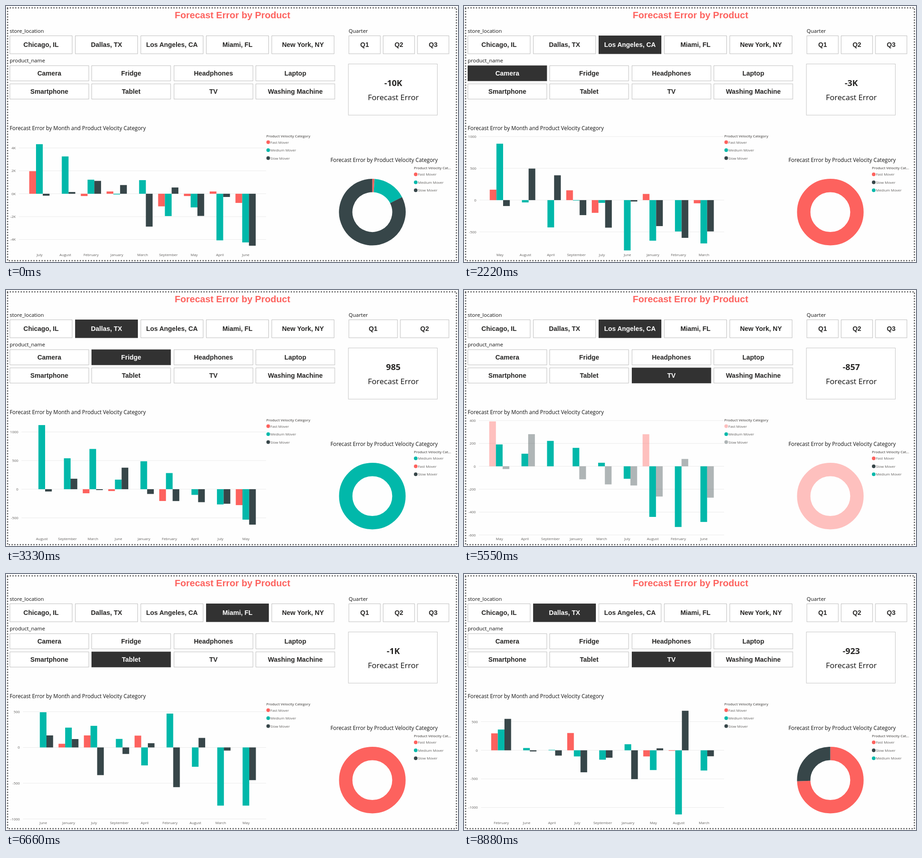
Animation of 994 by 563 pixels, one loop 9.99 s. Source, as an HTML page:

```html
<!DOCTYPE html>
<html lang="en">
<head>
<meta charset="utf-8">
<title>Forecast dashboard</title>
<style>
  html, body { margin: 0; width: 100%; height: 100%; overflow: hidden; background: #fefefe; }
  svg { display: block; font-family: "Open Sans", "Noto Sans", sans-serif; }
  .title { font: bold 20.5px "Liberation Sans", Arial, sans-serif; fill: #fd625e; }
  .btn { font: bold 14.35px "Liberation Sans", Arial, sans-serif; fill: #252423; }
  .on { fill: #fff; }
  .head { font-size: 11.75px; fill: #111; }
  .field { font-size: 11.5px; fill: #111; }
  .kpi { font-size: 18.6px; font-weight: 700; fill: #252423; }
  .sub { font-size: 17.1px; fill: #111; }
  .small { font-size: 7.95px; fill: #605e5c; }
  .key { font-size: 7.8px; font-weight: 600; fill: #605e5c; }
</style>
</head>
<body>
<svg width="994" height="563" viewBox="0 0 994 563">
  <g id="fixed"></g>
  <g id="live"></g>
</svg>
<script>
const STEP = 1110;
const STORES = ['Chicago, IL', 'Dallas, TX', 'Los Angeles, CA', 'Miami, FL', 'New York, NY'];
const PRODUCTS = ['Camera', 'Fridge', 'Headphones', 'Laptop', 'Smartphone', 'Tablet', 'TV', 'Washing Machine'];
const MONTHS = ['January', 'February', 'March', 'April', 'May', 'June', 'July', 'August', 'September'];
const SERIES = {
  F: { name: 'Fast Mover', color: '#fd625e' },
  M: { name: 'Medium Mover', color: '#01b8aa' },
  S: { name: 'Slow Mover', color: '#374649' }
};
const PLOT = { top: 287, bottom: 538.8, right: 572 };

const text = (cls, x, y, str, anchor = 'start') =>
  `<text class="${cls}" x="${x}" y="${y}" text-anchor="${anchor}">${str}</text>`;
const rect = (x, y, w, h, attrs) =>
  `<rect x="${x}" y="${y}" width="${w}" height="${h}" ${attrs}/>`;
// A focused series dims the others
const opacity = (k, focus) => focus && k !== focus ? 0.4 : 1;

function button(x, y, w, h, label, on) {
  const look = on ? 'fill="#323232" stroke="#323232"' : 'fill="#fff" stroke="#bdbdbd"';
  return rect(x, y, w, h, look) +
    text('btn' + (on ? ' on' : ''), x + w / 2, y + h / 2 + 5, label, 'middle');
}

function slicers({ store, product, quarters = 3 }) {
  const w = (220 - 6.3 * (quarters - 1)) / quarters;
  const shops = STORES.map((s, i) => button(8.5 + i * 144, 65.5, 137, 39.5, s, s === store));
  const goods = PRODUCTS.map((p, i) =>
    button(Math.round(8 + i % 4 * 180.25) + 0.5, i > 3 ? 171.2 : 131.2, 173.5, 33.5, p, p === product));
  const terms = Array.from({ length: quarters }, (_, i) =>
    button(754 + i * (w + 6.3), 65.5, w, 39.5, 'Q' + (i + 1)));
  return [...shops, ...goods, ...terms].join('');
}

function legend(x, y, keys, focus) {
  return [...keys].map((k, i) => {
    const cy = y + i * 17.5;
    return `<circle cx="${x}" cy="${cy}" r="4" fill="${SERIES[k].color}" opacity="${opacity(k, focus)}"/>` +
      text('small', x + 5, cy + 3, SERIES[k].name);
  }).join('');
}

// Smallest step of 1, 2 or 5 times a power of ten that needs at most five intervals
function niceStep(range) {
  const unit = 10 ** Math.floor(Math.log10(range / 5));
  return [1, 2, 5, 10].map(n => n * unit).find(s => range / s <= 5);
}

// Linear interpolation through key points { rank: value }
function between(keys, rank) {
  const ranks = Object.keys(keys).map(Number);
  const b = ranks.find(r => r >= rank);
  if (b === rank) return keys[b];
  const a = ranks.filter(r => r < rank).pop();
  return keys[a] + (keys[b] - keys[a]) * (rank - a) / (b - a);
}

function random(seed) {
  return () => (seed = seed * 16807 % 2147483647) / 2147483647;
}

// Months are ranked by total; the slow series is what the others leave of it
function rows({ totals, fast, medium, seed, lo, hi }) {
  const rnd = random(seed || 1), range = hi - lo;
  return MONTHS.map((_, i) => {
    const total = between(totals, i);
    const f = fast ? fast[i] || 0 : rnd() < 0.5 ? 0 : (rnd() - 0.5) * range * 0.15;
    const m = medium ? medium[i] : total * 0.6 + (rnd() - 0.5) * range * 0.3;
    return [['F', f], ['M', m], ['S', total - f - m]];
  });
}

function bars(v) {
  const { lo, hi, unit = '', months, focus } = v;
  const scale = (PLOT.bottom - PLOT.top) / (hi - lo);
  const yOf = n => PLOT.top + (hi - n) * scale;
  const tick = niceStep(hi - lo), ticks = [];
  for (let n = Math.ceil(lo / tick); n <= hi / tick; n++) ticks.push(n * tick);
  const labelWidth = s => [...s].reduce((w, c) => w + (c === '-' ? 3.3 : 4.5), 0);
  const left = 16 + Math.max(...ticks.map(n => labelWidth(n + unit)));
  const width = PLOT.right - left, pad = width * 0.083;
  const step = (width - 2 * pad) / 8, w = step * 0.262;
  const xOf = i => left + pad + i * step;

  const grid = ticks.map(n =>
    `<path d="M${left} ${yOf(n)}H${PLOT.right}" stroke="#eaeaea"/>` +
    text('small', left - 7, yOf(n) + 2.8, n + unit, 'end'));
  const columns = rows(v).flatMap((row, i) => row.map(([k, n], j) =>
    rect(xOf(i) + (j - 1.5) * w, yOf(Math.max(n, 0)), w, Math.abs(n) * scale,
      `fill="${SERIES[k].color}" opacity="${opacity(k, focus)}"`)));
  const names = [...months].map((d, i) => text('small', xOf(i) + 0.3, 550, MONTHS[d - 1], 'middle'));
  return [...grid, ...columns, ...names].join('');
}

// slices: [series, end angle in degrees, clockwise from the top]
function donut(slices, focus) {
  const r = 58.5;
  let from = 0;
  return slices.map(([k, to]) => {
    const arc = `<circle r="${r}" fill="none" stroke="${SERIES[k].color}" stroke-width="29.4"
      pathLength="360" stroke-dasharray="${to - from} 360" opacity="${opacity(k, focus)}"
      transform="translate(805.6 453.2) rotate(${from - 90})"/>`;
    from = to;
    return arc;
  }).join('');
}

const view = v => slicers(v) + text('kpi', 851.7, 176.3, v.kpi, 'middle') + bars(v) +
  legend(576.6, 299.5, 'FMS', v.focus) +
  donut(v.slices || [[v.order[0], 360]], v.focus) +
  legend(901, 370.2, v.order);

const overall = {
  kpi: '-10K', lo: -5, hi: 5, unit: 'K', months: '782139546', order: 'FMS',
  slices: [['F', 3.8], ['M', 63.2], ['S', 360]],
  totals: { 0: 6.13, 1: 3.41, 3: 0.9, 4: -1.68, 7: -4.15, 8: -9.59 },
  fast: { 0: 1.97, 2: -0.2, 3: 0.2, 5: -1.1, 6: -0.2, 7: 0.2, 8: -0.8 },
  medium: [4.33, 3.26, 1.23, -0.06, 1.19, -1.95, -1.19, -4.07, -4.25]
};

const angeles = {
  store: 'Los Angeles, CA', kpi: '-7K', lo: -4, hi: 4, unit: 'K', months: '584976123', order: 'FSM',
  totals: { 0: 2.5, 8: -4 }, seed: 4127
};

const camera = {
  store: 'Los Angeles, CA', product: 'Camera', kpi: '-3K', lo: -800, hi: 1000, months: '584976123', order: 'FSM',
  totals: { 0: 958, 2: -39, 3: -89, 4: -676, 8: -1223 },
  fast: { 0: 164, 3: 154, 4: -200, 6: 97, 8: -50 },
  medium: [887, -36, -429, -7, -43, -791, -638, -493, -681]
};

const fridge = {
  store: 'Dallas, TX', product: 'Fridge', quarters: 2, kpi: '985', lo: -800, hi: 1200, months: '893612475', order: 'MFS',
  totals: { 0: 1080, 1: 723, 4: 405, 5: -131, 7: -520, 8: -1429 },
  fast: { 2: -71, 3: -32, 5: -206, 8: -278 },
  medium: [1120, 540, 703, 167, 488, 282, -99, -266, -532]
};

const tvAngeles = {
  store: 'Los Angeles, CA', product: 'TV', focus: 'M', kpi: '-857', lo: -600, hi: 400, months: '549137826', order: 'FSM',
  totals: { 0: 559, 2: 222, 4: -127, 6: -426, 7: -466, 8: -760 },
  fast: { 0: 392, 6: 280 },
  medium: [191, 110, 222, 161, 31, -109, -442, -530, -486]
};

const tablet = {
  store: 'Miami, FL', product: 'Tablet', kpi: '-1K', lo: -1000, hi: 600, months: '617942835', order: 'FMS',
  totals: { 0: 660, 1: 445, 2: 83, 6: -137, 7: -857, 8: -1270 },
  fast: { 1: 51, 2: 168, 4: 165 },
  medium: [492, 277, 302, 119, -251, 473, -270, -813, -813]
};

const tabletDallas = {
  store: 'Dallas, TX', product: 'Tablet', kpi: '-900', lo: -1200, hi: 800, months: '264791583', order: 'FMS',
  totals: { 0: 700, 8: -900 }, seed: 2718
};

const tvDallas = {
  store: 'Dallas, TX', product: 'TV', kpi: '-923', lo: -1200, hi: 800, months: '264791583', order: 'FSM',
  slices: [['F', 268], ['S', 360]],
  totals: { 0: 1208, 1: 20, 5: -398, 8: -457 },
  fast: { 0: 296, 3: 302, 6: -107, 7: -8 },
  medium: [363, 40, 8, -107, -164, 106, -345, -1120, -353]
};

const views = [
  overall, angeles, camera, fridge, { ...fridge, focus: 'F', kpi: '-582' },
  tvAngeles, tablet, tabletDallas, tvDallas
].map(view);

document.getElementById('fixed').innerHTML =
  rect(3.5, 4, 987, 556, 'fill="none" stroke="#555" stroke-width="3" stroke-linecap="round" stroke-dasharray="0 6"') +
  text('title', 498, 27, 'Forecast Error by Product', 'middle') +
  text('field', 8, 58.5, 'store_location') +
  text('field', 8, 124.2, 'product_name') +
  text('field', 753.5, 58.5, 'Quarter') +
  rect(753, 127.5, 195.5, 112.5, 'fill="#fff" stroke="#c4c4c4"') +
  text('sub', 851.7, 207, 'Forecast Error', 'middle') +
  text('head', 8, 273, 'Forecast Error by Month and Product Velocity Category') +
  text('head', 713.5, 343, 'Forecast Error by Product Velocity Category') +
  text('key', 572.5, 288.5, 'Product Velocity Category') +
  text('key', 897, 359.3, 'Product Velocity Cat...');

const live = document.getElementById('live');
let shown = -1;
function tick() {
  const i = Math.floor(performance.now() / STEP) % views.length;
  if (i !== shown) live.innerHTML = views[shown = i];
  requestAnimationFrame(tick);
}
tick();
</script>
</body>
</html>
```
